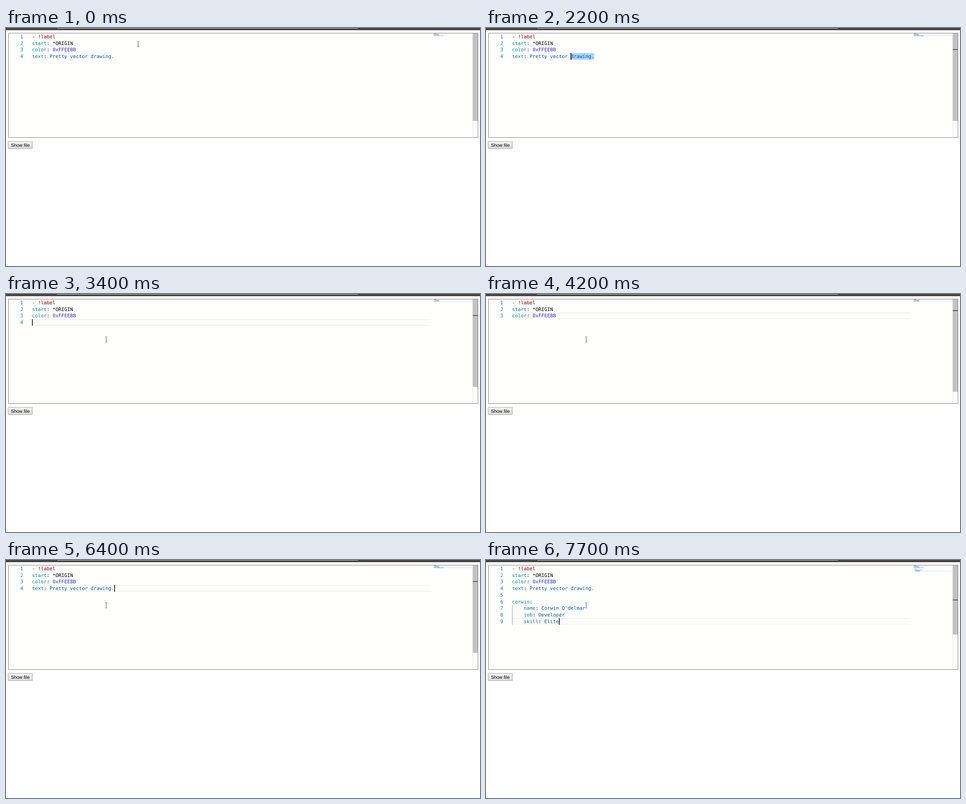
Write an HTML page with a canvas that moves like this. It is 1055 by 531 pixels and loops after 8 s.

```html
<!DOCTYPE html>
<html lang="en">
<head>
<meta charset="utf-8">
<title>Editor</title>
<style>
  html, body { margin: 0; width: 100%; height: 100%; overflow: hidden; background: #fff; }
  canvas { display: block; }
</style>
</head>
<body>
<canvas id="stage" width="1055" height="531"></canvas>
<script>
const ctx = document.getElementById('stage').getContext('2d');
const LOOP = 8000;
const ZOOM = 0.775;                 // the page is shown at 77.5 %
const FONT = 14 * ZOOM;
const CHAR = FONT * 0.60205;
const LINE = 19 * ZOOM;
const LEFT = 57.9, TOP = 11.9, VIEW = 232.5;
const MAP_X = 952, MAP_LINE = 2 * ZOOM;
const TEAL = '#008080', BLUE = '#0451a5', BLACK = '#000';

const head = ['- !label', 'start: *ORIGIN', 'color: 0xFFEEBB'];
const full = [...head, 'text: Pretty vector drawing.'];
const pasted = [...full, '', 'corwin:', "    name: Corwin Q'delmar",
  '    job: Developer', '    skill: Elite'];
const END = full[3].length;

// Editing steps: start time, lines, caret row and column, selection anchor
const steps = [
  [0, full],
  [1300, full, 3, END],
  [2000, full, 3, 0, END],
  [3400, [...head, ''], 3, 0],
  [3700, head, 2, 16],
  [4800, [...head, ''], 3, 0],
  [5500, full, 3, 0, END],
  [6400, full, 3, END],
  [6700, [...full, ''], 4, 0],
  [7000, [...full, '', ''], 5, 0],
  [7700, pasted, 8, 16],
];

function pointerAt(t) {
  if (t < 900) return [294, 36];
  if (t < 1000) return [284, 62];
  if (t < 2000) return [279.5, 61];
  if (t < 2800) {
    const k = Math.min(1, (Math.floor(t / 100) - 19) / 7);
    const e = k * k * (3 - 2 * k);
    return [279.5 - 230.5 * e, 61 + 6 * e];
  }
  return t < 2900 ? [140, 87] : [223, 101];
}

function editorAt(t) {
  let [since, lines, row, col, anchor] = steps.findLast(s => s[0] <= t);
  if (since === 2000) {
    const x = pointerAt(t)[0];
    col = Math.max(0, Math.min(END, Math.round((x - LEFT) / CHAR)));
    since = Math.min(t, 2600);
  }
  const selecting = anchor !== undefined && anchor !== col;
  return { lines, row, col, anchor, selecting, caretOn: t - since < 500 };
}

function tokens(line) {
  if (line.startsWith('- ')) return [[0, '-', BLACK], [2, line.slice(2), '#800000']];
  const m = line.match(/^(\s*)(\w+): ?(.*)$/);
  if (!m) return [];
  const [, indent, key, value] = m;
  const colon = indent.length + key.length;
  const color = value[0] === '*' ? BLACK : value.startsWith('0x') ? '#3030c0' : BLUE;
  return [[indent.length, key, TEAL], [colon, ':', BLACK], [colon + 2, value, color]];
}

const columnX = col => LEFT + col * CHAR;
const rowY = row => TOP + row * LINE;

function rect(x, y, w, h, color) {
  ctx.fillStyle = color;
  ctx.fillRect(x, y, w, h);
}

function text(str, x, y, color) {
  ctx.fillStyle = color;
  ctx.fillText(str, x, y);
}

function drawPage() {
  rect(0, 0, 1055, 531, '#fff');
  rect(0, 0, 1055, 4, '#464443');
  rect(0, 4, 1055, 1, '#5c5a59');
  rect(114, 0, 669, 1, '#d0cfce');
  rect(5, 11, 1046, 234, '#808080');
  rect(6, 12, 1044, 232, '#fffffe');

  rect(4.5, 252.5, 54.5, 17, '#999');
  const face = ctx.createLinearGradient(0, 253, 0, 269);
  face.addColorStop(0, '#f5f5f5');
  face.addColorStop(1, '#dcdcdc');
  rect(5.4, 253.4, 52.7, 15.2, face);
  ctx.font = `${13.333 * ZOOM}px "Liberation Sans", Arial, sans-serif`;
  ctx.textAlign = 'left';
  text('Show file', 10.9, 264.6, '#000');
}

function drawCurrentLine(y) {
  const edge = 2 * ZOOM, color = '#eee';
  rect(LEFT, y, 946 - LEFT, edge, color);
  rect(LEFT, y + LINE - edge, 946 - LEFT, edge, color);
  rect(LEFT, y + edge, edge, LINE - 2 * edge, color);
}

function drawText(lines) {
  ctx.font = `${FONT}px "DejaVu Sans Mono", monospace`;
  lines.forEach((line, row) => {
    const base = rowY(row) + 11.1;
    ctx.textAlign = 'right';
    text(row + 1, 38.2, base, '#237893');
    ctx.textAlign = 'left';
    if (line.startsWith('    ')) rect(58, rowY(row), 0.9, LINE, '#939393');
    for (const [col, str, color] of tokens(line)) text(str, columnX(col), base, color);
  });
}

function drawMinimap({ lines, row, col, anchor, selecting }) {
  if (row !== undefined) {
    const y = TOP + row * MAP_LINE;
    rect(MAP_X, y, 86, MAP_LINE, '#d6eaff');
    if (selecting) rect(MAP_X + col * ZOOM, y, (anchor - col) * ZOOM, MAP_LINE, '#add6ff');
  }
  ctx.globalAlpha = 0.5;
  lines.forEach((line, i) => {
    for (const [col, str, color] of tokens(line)) {
      [...str].forEach((c, k) => {
        if (c !== ' ') rect(MAP_X + (col + k) * ZOOM, TOP + i * MAP_LINE + 0.2, ZOOM, 1.1, color);
      });
    }
  });
  ctx.globalAlpha = 1;
}

function drawScrollbar({ lines, row }) {
  const ratio = VIEW / (VIEW + (lines.length - 1) * LINE);
  rect(1038.3, 12, 0.8, 232, '#ddd');
  rect(1039, 12, 11, VIEW * ratio - 0.1, '#c1c1c1');
  if (row !== undefined) rect(1039, 10.2 + row * LINE * ratio, 11, 2 * ZOOM, '#424242');
}

function drawArrow(x, y) {
  ctx.beginPath();
  [[0, 0], [0, 10.5], [2.4, 8.4], [4, 12], [5.7, 11.2], [4.2, 7.7], [7.2, 7.4]]
    .forEach(([dx, dy]) => ctx.lineTo(x + dx, y + dy));
  ctx.closePath();
  ctx.strokeStyle = '#fff';
  ctx.lineWidth = 1.4;
  ctx.stroke();
  ctx.fillStyle = '#000';
  ctx.fill();
}

function drawBeam(x, y) {
  const color = '#444';
  rect(x - 0.5, y - 5.5, 1, 11, color);
  for (const dy of [-6.4, 5.5]) {
    rect(x - 2.4, y + dy, 1.9, 0.9, color);
    rect(x + 0.5, y + dy, 1.9, 0.9, color);
  }
}

function draw(t) {
  const editor = editorAt(t);
  const { lines, row, col, anchor, selecting, caretOn } = editor;
  ctx.textRendering = 'geometricPrecision';
  drawPage();
  if (selecting) {
    ctx.fillStyle = '#add6ff';
    ctx.beginPath();
    ctx.roundRect(columnX(col), rowY(row), (anchor - col) * CHAR, LINE, 2.3);
    ctx.fill();
  } else if (row !== undefined) {
    drawCurrentLine(rowY(row));
  }
  drawText(lines);
  if (row !== undefined && caretOn) rect(columnX(col), rowY(row), 2 * ZOOM, LINE, '#000');
  drawMinimap(editor);
  drawScrollbar(editor);
  const [x, y] = pointerAt(t);
  (x < LEFT ? drawArrow : drawBeam)(x, y);
}

const start = performance.now();
function tick() {
  draw((performance.now() - start) % LOOP);
  requestAnimationFrame(tick);
}
tick();
</script>
</body>
</html>
```
